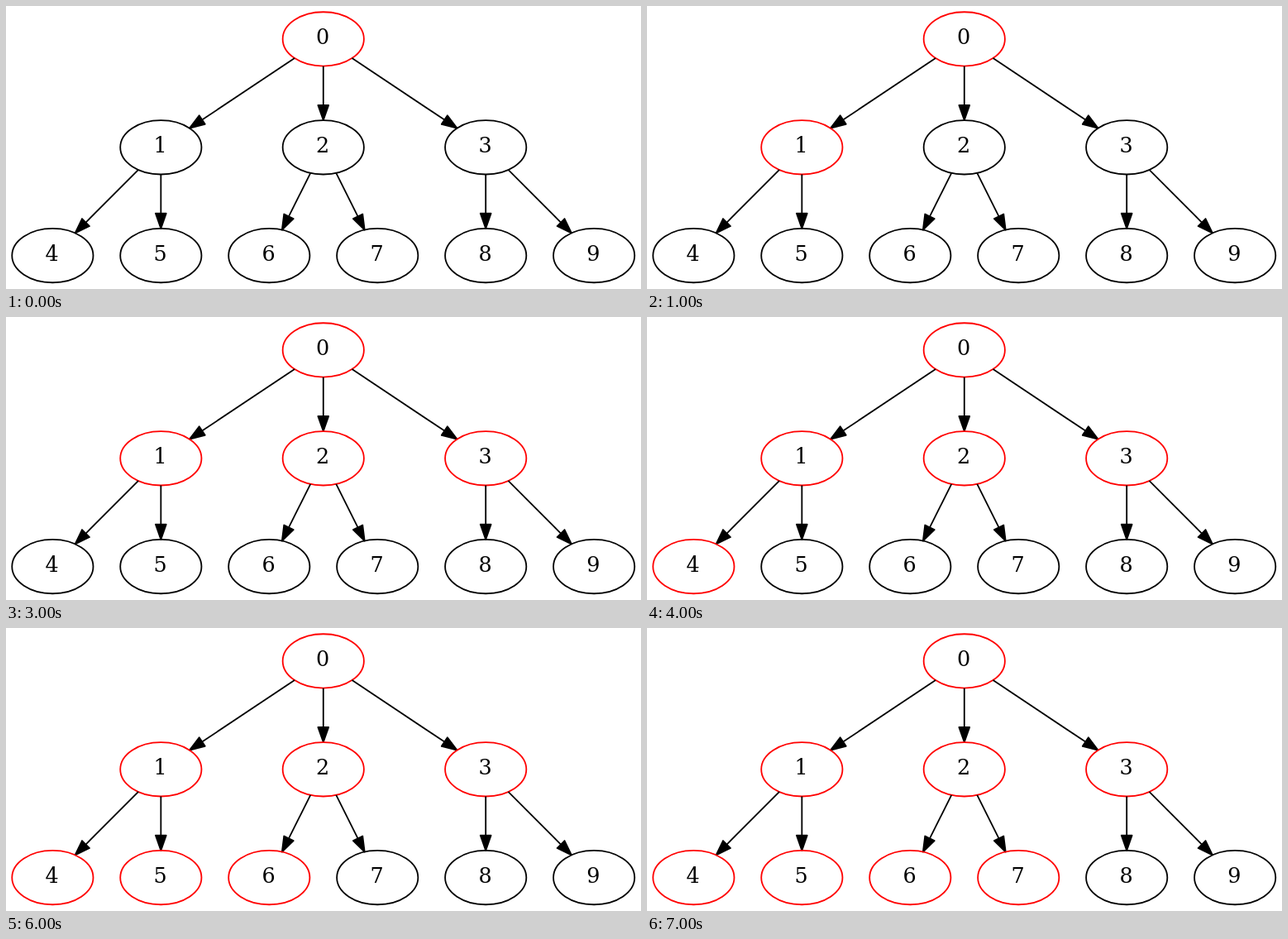
An HTML page for the animation above (8000 ms loop, 768x342 px).

```html
<!DOCTYPE html>
<html lang="en">
<head>
<meta charset="utf-8">
<title>Breadth-first traversal</title>
<style>
  html, body { margin: 0; width: 100%; height: 100%; overflow: hidden; background: #fff; }
  svg { display: block; width: 768px; height: 342px; filter: blur(0.4px); }
  ellipse { fill: none; stroke: #000; }
  ellipse.visited { stroke: #f00; }
  line, polygon { stroke: #000; stroke-linejoin: round; }
  text { font: 14px "DejaVu Serif", serif; text-anchor: middle; }
</style>
</head>
<body>
<svg id="tree" viewBox="0 0 422.25 188.25" preserveAspectRatio="none"></svg>
<script>
const STEP = 1000, STEPS = 8, NODES = 10;
const RX = 27, RY = 18, GAP = 72;
const tree = document.getElementById('tree');

function add(tag, attrs, text = '') {
  const el = document.createElementNS('http://www.w3.org/2000/svg', tag);
  for (const name in attrs) el.setAttribute(name, attrs[name]);
  el.textContent = text;
  return tree.appendChild(el);
}

// Root, three children, then two leaves under each child
function place(i) {
  if (i === 0) return { x: 211, y: 22 };
  if (i < 4) return { x: 103 + 1.5 * GAP * (i - 1), y: 22 + GAP, parent: 0 };
  return { x: 31 + GAP * (i - 4), y: 22 + 2 * GAP, parent: i >> 1, leaf: true };
}

// Straight arrow between the outlines of two nodes
function connect(from, to) {
  const dx = to.x - from.x, dy = to.y - from.y;
  const length = Math.hypot(dx, dy), ux = dx / length, uy = dy / length;
  const trim = 1 / Math.hypot(dx / RX, dy / RY);
  const tipX = to.x - dx * trim, tipY = to.y - dy * trim;
  const baseX = tipX - 10 * ux, baseY = tipY - 10 * uy;
  const wx = -3.5 * uy, wy = 3.5 * ux;
  add('line', { x1: from.x + dx * trim, y1: from.y + dy * trim, x2: baseX, y2: baseY });
  add('polygon', { points: [tipX, tipY, baseX + wx, baseY + wy, baseX - wx, baseY - wy] });
}

const nodes = Array.from({ length: NODES }, (_, i) => place(i));
nodes.forEach((node, i) => {
  const { x, y, leaf } = node;
  if (i > 0) connect(nodes[leaf ? node.parent - 1 : 0], node);
  add('text', { x: x - 0.4, y: y + 3.4 }, i);
  node.outline = add('ellipse', { cx: x, cy: y, rx: RX, ry: RY });
});

function draw() {
  const current = Math.floor(performance.now() / STEP) % STEPS;
  nodes.forEach(({ outline }, i) => outline.classList.toggle('visited', i <= current));
  requestAnimationFrame(draw);
}
draw();
</script>
</body>
</html>
```
